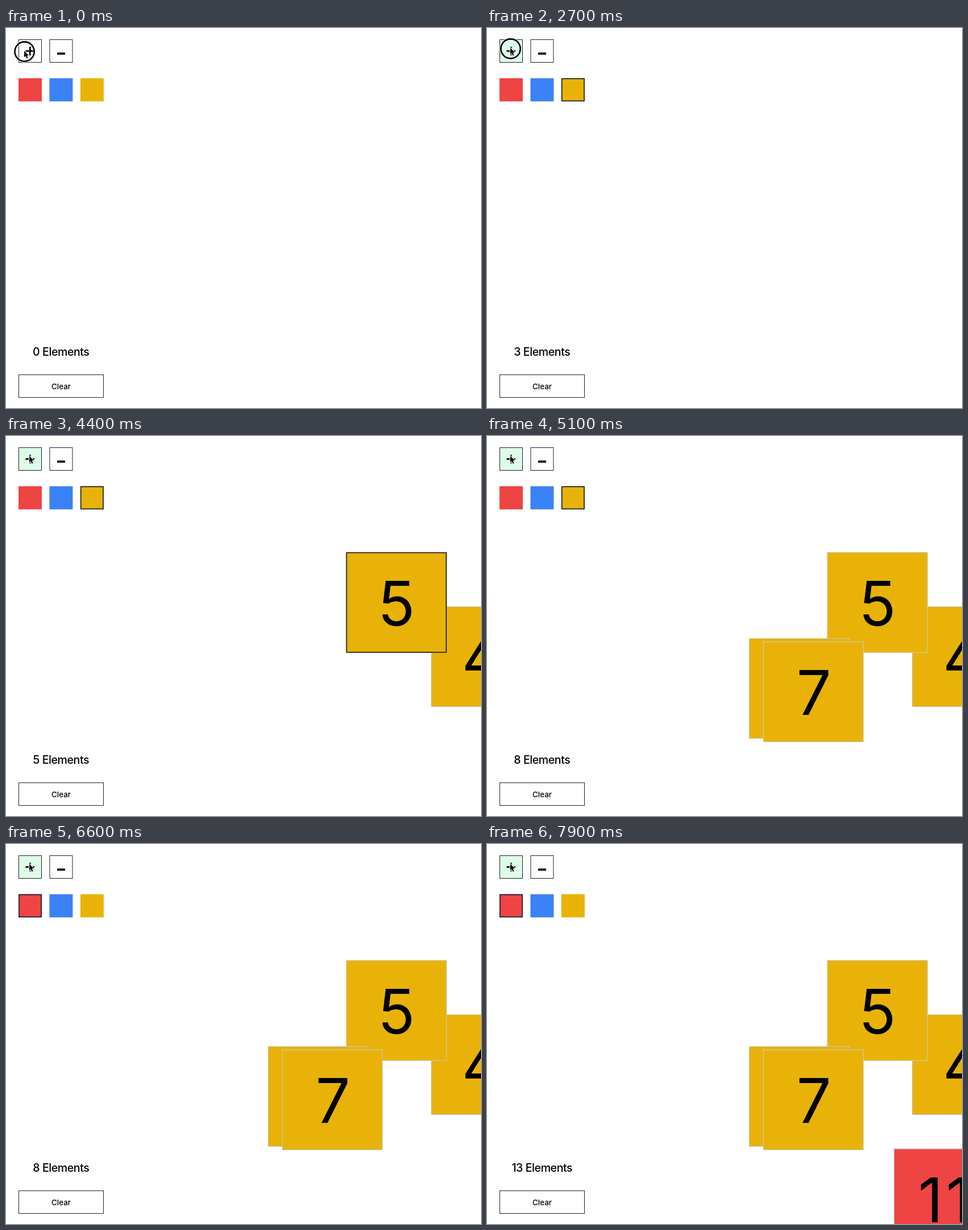
An HTML page with a canvas for the animation above (8000 ms loop, 836 px wide and 669 px high).

```html
<!DOCTYPE html>
<html lang="en">
<head>
<meta charset="utf-8">
<title>Element counter</title>
<style>
  html, body { margin: 0; width: 100%; height: 100%; overflow: hidden; background: #fff; }
  canvas { display: block; }
</style>
</head>
<body>
<canvas id="stage" width="836" height="669"></canvas>
<script>
const ctx = document.getElementById('stage').getContext('2d');
const FONT = 'Inter, "Liberation Sans", sans-serif';
const RED = '#ef4444', BLUE = '#3b82f6', YELLOW = '#e8b208';
const INK = '#1a2230', PALE = '#c9cad3';
const CARD = 177, PITCH = 54.45;

// Times are in ticks of 100 ms. A click holds for one tick before its release.
const TICK = 100, LOOP = 80, PICK_YELLOW = 10, PICK_RED = 62;
const burst = (first, step, n) => Array.from({ length: n }, (_, i) => first + i * step);
const adds = [...burst(18, 2.5, 3), ...burst(28, 16, 2), ...burst(48, 1.5, 3), ...burst(68, 2.6, 5)];
const releases = [1, PICK_YELLOW, PICK_RED, ...adds];

// Where the pointer rests: arrival, departure and place
const stops = [
  { from: 0, to: 4, x: 32, y: 40 },
  { from: 8, to: 10, x: 156, y: 117 },
  { from: 14, to: 14, x: 37, y: 19 },
  { from: 15, to: 53, x: 41, y: 35 },
  { from: 58, to: 64, x: 42, y: 106 },
  { from: 66, to: LOOP, x: 41, y: 35 }
];

// Cards that land inside the stage; the others fall outside it.
const cards = [
  { n: 4, x: 748, y: 300 },
  { n: 5, x: 598.6, y: 204.6 },
  { n: 6, x: 461, y: 356 },
  { n: 7, x: 486, y: 362 },
  { n: 11, x: 716, y: 536.5 }
];

// The border lies inside the box.
function box(x, y, w, h, fill, border, line = 1) {
  ctx.fillStyle = fill;
  ctx.fillRect(x, y, w, h);
  if (!border) return;
  ctx.strokeStyle = border;
  ctx.lineWidth = line;
  ctx.strokeRect(x + line / 2, y + line / 2, w - line, h - line);
}

function label(text, x, y, size, weight = 450, spacing = 0) {
  ctx.font = `${weight} ${size}px ${FONT}`;
  ctx.letterSpacing = spacing + 'px';
  ctx.textAlign = 'center';
  ctx.fillStyle = '#000';
  ctx.fillText(text, x + spacing / 2, y);
}

function poly(points) {
  ctx.beginPath();
  points.forEach(([x, y]) => ctx.lineTo(x, y));
  ctx.closePath();
  ctx.lineJoin = 'round';
  ctx.strokeStyle = '#fff';
  ctx.lineWidth = 2;
  ctx.stroke();
  ctx.fillStyle = '#000';
  ctx.fill();
}

function pointerAt(tick) {
  const i = stops.findIndex(s => tick <= s.to);
  const b = stops[i], a = stops[i - 1] || b;
  if (tick >= b.from) return b;
  const p = (tick - a.to) / (b.from - a.to), k = p * p * (3 - 2 * p);
  return { x: a.x + (b.x - a.x) * k, y: a.y + (b.y - a.y) * k };
}

function drawPanel(tick, count, pointer) {
  const hover = tick >= 14 && pointer.x < 63 && pointer.y < 61;
  box(22, 20, 41, 41, hover ? '#dcfce7' : '#fff', INK);
  box(22 + PITCH, 20, 41, 41, '#fff', INK);
  ctx.fillStyle = '#000';
  ctx.fillRect(34.5, 39.2, 15.5, 2.7);
  ctx.fillRect(40.9, 33, 2.7, 15.3);
  ctx.fillRect(90, 43.2, 14, 3.7);

  const picked = tick < PICK_YELLOW ? '' : tick < PICK_RED ? YELLOW : RED;
  [RED, BLUE, YELLOW].forEach((color, i) =>
    box(22 + i * PITCH, 88.4, 41, 40.8, color, color === picked && INK, 1.7));

  label(`${count} Elements`, 97, 577, 19.6, 450, -0.45);
  box(22, 610, 150, 41, '#fff', INK);
  label('Clear', 97, 636, 13.4);
}

// The newest card keeps a dark border for ten ticks.
function drawCard({ n, x, y }, tick, count) {
  if (n > count) return;
  const fresh = n === count && tick < adds[n - 1] + 10;
  box(x, y, CARD, CARD, n < 9 ? YELLOW : RED, fresh ? INK : PALE, fresh ? 1.7 : 1);
  label(n, x + CARD / 2 + 0.7, y + 129, 108, 400, 5);
}

function drawPointer(tick, { x, y }) {
  ctx.save();
  ctx.translate(x, y);
  if (tick === 14) {
    const half = [[-8, 0], [-3.5, -4], [-3.5, -0.9], [3.5, -0.9], [3.5, -4]];
    ctx.rotate(Math.PI / 4);
    poly([...half, ...half.map(([px, py]) => [-px, -py])]);
  } else {
    poly([[0, 0], [0, 11.5], [2.6, 9.2], [4.6, 13.8], [6.6, 12.9], [4.7, 8.5], [8.2, 8.2]]);
  }
  ctx.restore();

  if (!releases.some(off => tick >= off - 1 && tick < off)) return;
  ctx.beginPath();
  ctx.arc(x + 0.6, y + 1.5, 17.1, 0, Math.PI * 2);
  ctx.strokeStyle = 'rgba(255,255,255,.6)';
  ctx.lineWidth = 4.5;
  ctx.stroke();
  ctx.strokeStyle = '#000';
  ctx.lineWidth = 2.6;
  ctx.stroke();
}

function draw(ms) {
  const tick = Math.floor(ms / TICK) % LOOP;
  const count = adds.filter(off => tick >= off).length;
  const pointer = pointerAt(tick);
  ctx.fillStyle = '#fff';
  ctx.fillRect(0, 0, 836, 669);
  drawPanel(tick, count, pointer);
  cards.forEach(card => drawCard(card, tick, count));
  drawPointer(tick, pointer);
}

const start = performance.now();
(function frame() {
  draw(performance.now() - start);
  requestAnimationFrame(frame);
})();
</script>
</body>
</html>
```
